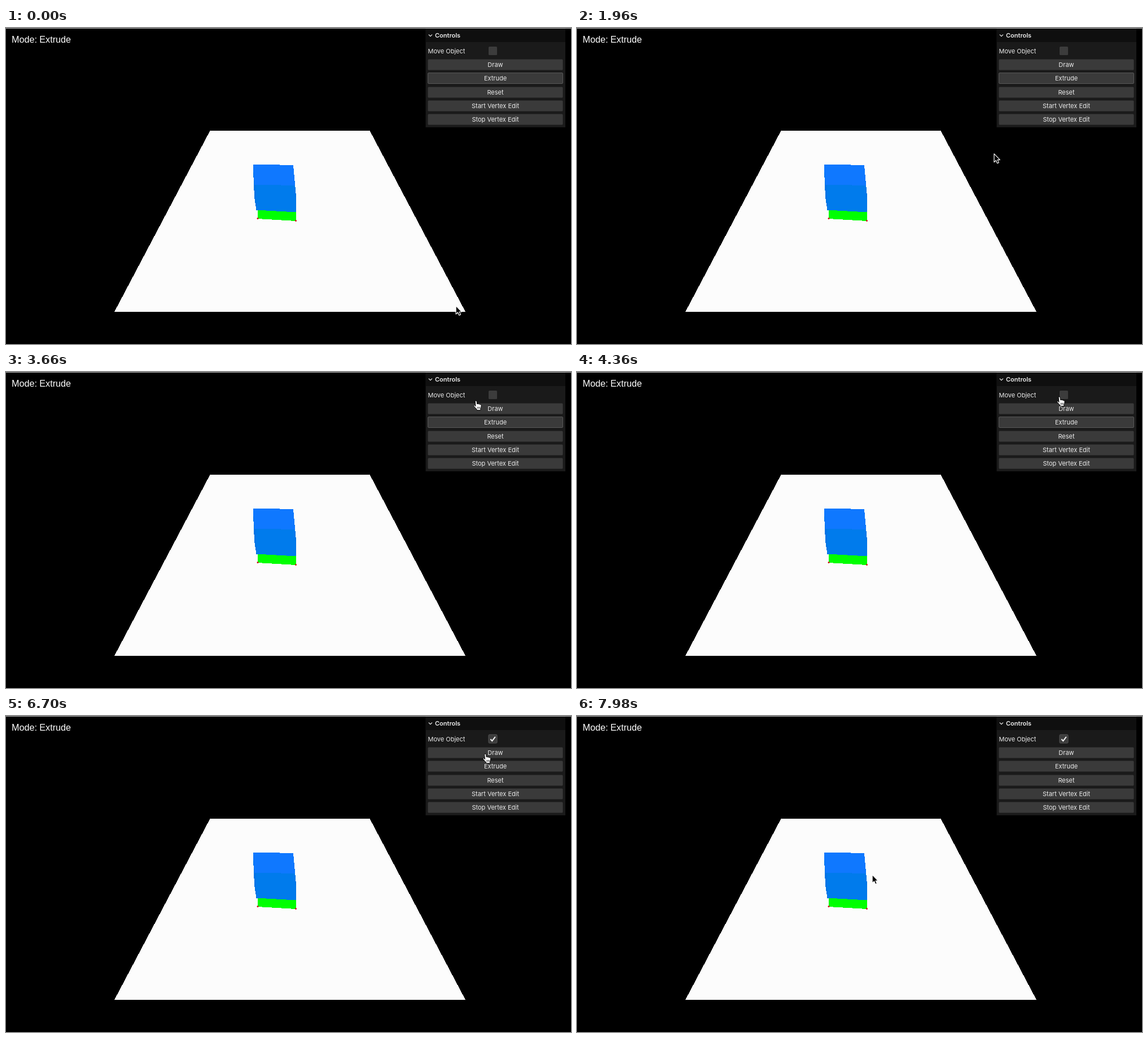
These frames come from a looping animation (1001 by 560 pixels, 8000 ms). An HTML page:

```html
<!DOCTYPE html>
<html lang="en">
<head>
<meta charset="utf-8">
<title>Extrude</title>
<style>
  html, body { margin: 0; width: 100%; height: 100%; overflow: hidden; background: #000; }
  svg { display: block; width: 1001px; height: 560px; }
  .ui { font: 11px Inter, sans-serif; fill: #ebebeb; }
  .title { font-weight: 600; }
  .mode { font: 16.15px "Liberation Sans", sans-serif; fill: #fff; }
</style>
</head>
<body>
<svg viewBox="0 0 1001 560">
  <rect width="1001" height="560"/>
  <rect width="1001" height="1" fill="#b8b8b8"/>
  <g shape-rendering="crispEdges">
    <path d="M361.5 182H644.5L814 503H192Z" fill="#fcfcfc"/>
    <path d="M446 321L513.5 324V342L446 338Z" fill="#0f0"/>
    <path d="M437.5 241.5L509 243L514.4 303V326.5L443.5 322.5L440 300Z" fill="#0074e6"/>
    <path d="M437.5 241.5L509 243L512 279L440 277.6Z" fill="#0f78ff"/>
    <path d="M442.5 277.7L512 279L513.2 326.4L444 322.4Z" fill="#007bec"/>
  </g>
  <g fill="#d01010">
    <circle cx="446" cy="337.5" r="1.5"/>
    <circle cx="513.5" cy="341.5" r="1.5"/>
  </g>

  <text class="mode" x="10" y="26">Mode: Extrude</text>

  <rect x="743.5" y="1" width="247.5" height="175" fill="#1a1a1a"/>
  <rect x="743.5" y="1" width="247.5" height="24" fill="#0f0f0f"/>
  <path d="M748.8 11.6l3.1 3.1l3.1-3.1" fill="none" stroke="#ebebeb" stroke-width="1.3"/>
  <text class="ui title" x="760" y="17">Controls</text>
  <text class="ui" x="747.5" y="44.5">Move Object</text>
  <rect id="box" x="855" y="33" width="15" height="15" rx="1.5" fill="#3c3c3c"/>
  <path id="tick" d="M858.3 41l3 3.2l5.6-7.4" fill="none" stroke="#f0f0f0" stroke-width="2"/>
  <g id="buttons"></g>

  <g id="arrow" stroke-linejoin="round">
    <path d="M.6 .8V15.6L4 12.5L6.2 17.6L8.9 16.5L6.7 11.5H11Z" stroke="#fff" stroke-width="1.2"/>
  </g>
  <g id="hand" stroke="#000" stroke-width=".9" stroke-linejoin="round">
    <path d="M3.6 9.4L2.9 2C2.8 .2 5.2 .1 5.5 1.8L6.1 6C6.5 5 8 5.1 8.3 6.2C8.9 5.4 10.2 5.6 10.5 6.8C11.3 6.2 12.7 6.7 12.8 8.1C12.9 10.4 12.2 11.6 11.7 13V15.8H5.4V14.2C4 12.8 2.4 11 .8 9.2C.1 8 1.6 7 2.6 8.1Z" fill="#fff"/>
    <path d="M6.7 10.4V13.4M8.5 10.4V13.4M10.3 10.4V13.4" fill="none" stroke-width=".7"/>
  </g>
</svg>
<script>
const LOOP = 8000;
const PRESS = 120, CHECK = 127, HOVER_LAG = 2;
const $ = id => document.getElementById(id);

const rowTop = i => 55 + i * 24.25;
const make = (name, attrs, text = '') => {
  const el = document.createElementNS('http://www.w3.org/2000/svg', name);
  for (const key in attrs) el.setAttribute(key, attrs[key]);
  el.textContent = text;
  $('buttons').append(el);
  return el;
};
const labels = ['Draw', 'Extrude', 'Reset', 'Start Vertex Edit', 'Stop Vertex Edit'];
const rows = labels.map((label, i) => {
  const y = Math.round(rowTop(i));
  const rect = make('rect', { x: 747.5, y: y + .5, width: 239, height: 19, rx: 1.5 });
  make('text', { class: 'ui', x: 867, y: y + 13.7, 'text-anchor': 'middle' }, label);
  return rect;
});

const linear = u => u;
const smooth = u => u * u * (3 - 2 * u);
const speedUp = u => u ** 2.5;
const slowDown = u => 1 - (1 - u) ** 2;

// Each stop of the pointer, with the easing that leads to it
const stops = [
  { at: 0, x: 797, y: 492 },
  { at: 26, x: 704, y: 356, ease: linear },
  { at: 61, x: 784, y: 50, ease: smooth },
  { at: 79, x: 834, y: 50, ease: linear },
  { at: 107, x: 862, y: 41, ease: slowDown },
  { at: 135, x: 862, y: 41, ease: linear },
  { at: 151, x: 797, y: 183, ease: speedUp },
  { at: 171, x: 523, y: 281, ease: slowDown }
];

function pointer(step) {
  const k = Math.max(1, stops.findIndex(s => s.at >= step));
  const a = stops[k - 1], b = stops[k];
  const u = b.ease((step - a.at) / (b.at - a.at));
  return [a.x + (b.x - a.x) * u, a.y + (b.y - a.y) * u];
}

// The picture updates three times per 140 ms, after holds of 20, 100 and 20 ms.
function stepAt(t) {
  const r = t % 140;
  return Math.floor(t / 140) * 3 + (r >= 120 ? 2 : r >= 20 ? 1 : 0);
}

const outline = (el, on) => el.setAttribute('stroke', on ? '#575757' : 'none');
const show = (el, on) => el.setAttribute('visibility', on ? 'visible' : 'hidden');
const move = (el, x, y, size = 1) =>
  el.setAttribute('transform', `translate(${x} ${y}) scale(${size})`);

function draw(t) {
  const step = stepAt(t);
  const [x, y] = pointer(step);
  const [hx, hy] = pointer(Math.max(0, step - HOVER_LAG));
  rows.forEach((row, i) => {
    const over = hx > 748 && hx < 987 && hy >= rowTop(i) && hy < rowTop(i) + 20;
    row.setAttribute('fill', over ? '#464646' : '#3a3a3a');
    outline(row, i === 1 && step < PRESS);
  });
  outline($('box'), step >= PRESS);
  show($('tick'), step >= CHECK);

  const onPanel = x > 748 && x < 987 && y < 172;
  show($('arrow'), !onPanel);
  show($('hand'), onPanel);
  move($('arrow'), x - .5, y - .5);
  move($('hand'), x - 6, y + .3, 1.1);
}

function tick() {
  draw(performance.now() % LOOP);
  requestAnimationFrame(tick);
}
tick();
</script>
</body>
</html>
```
